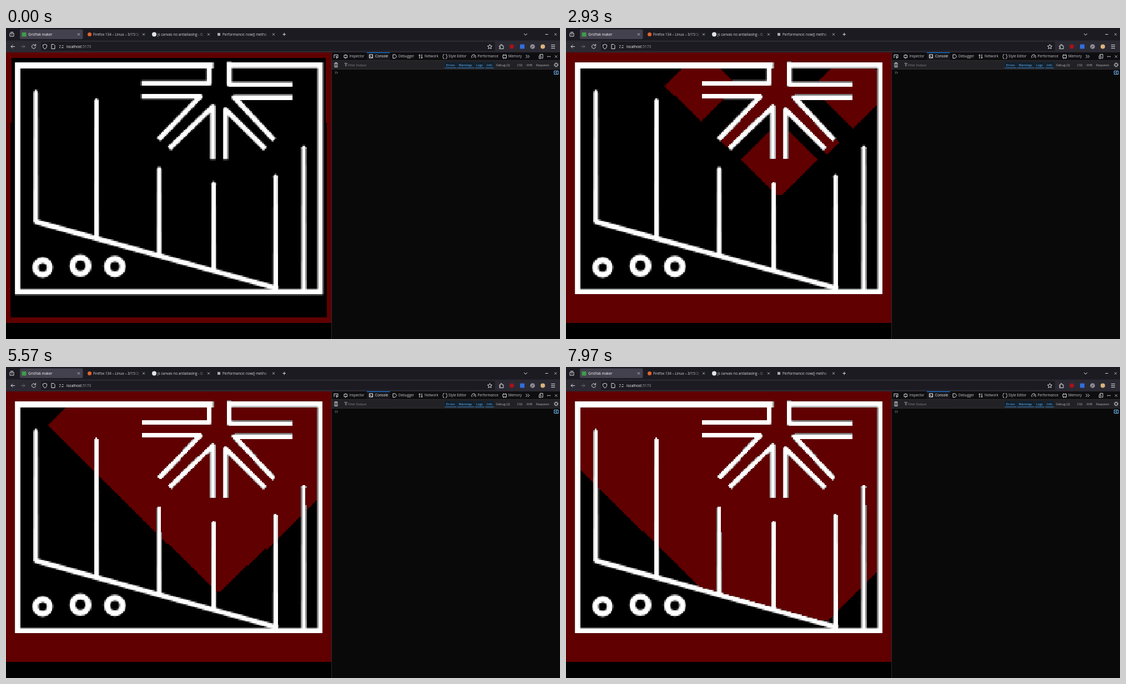
An HTML page with a canvas that plays this animation: 998 px wide and 561 px high, repeating every 8000 ms.

```html
<!DOCTYPE html>
<html lang="en">
<head>
<meta charset="utf-8">
<title>Flood fill</title>
<style>
html, body { margin: 0; width: 100%; height: 100%; overflow: hidden; background: #000; }
svg, canvas { position: absolute; left: 0; display: block; }
svg { top: 0; }
canvas { top: 44px; width: 586px; height: 488px; image-rendering: pixelated; }
text { font-family: "Open Sans", "Noto Sans", sans-serif; white-space: pre; }
.icon { fill: none; stroke: #dcdce2; stroke-width: 1; }
</style>
</head>
<body>
<svg width="998" height="561" viewBox="0 0 998 561">
  <defs>
    <linearGradient id="fade">
      <stop offset="0" stop-color="#1c1b22" stop-opacity="0"/>
      <stop offset="1" stop-color="#1c1b22"/>
    </linearGradient>
  </defs>
  <rect width="998" height="23" fill="#1c1b22"/>
  <rect x="25" y="2.5" width="113.500" height="17.500" rx="2" fill="#42414d"/>
  <rect y="22.500" width="998" height="21.500" fill="#2b2a33"/>
  <rect x="63" y="25" width="818" height="16.500" rx="2" fill="#1c1b22"/>
  <rect x="586" y="44" width="412" height="517" fill="#09090a"/>
  <rect x="587" y="44" width="411" height="15" fill="#0e0e11"/>
  <rect x="587" y="59" width="411" height="15.500" fill="#222226"/>
  <path d="M586.500 44V561M587 58.500H998M587 74.500H998" stroke="#2c2c32"/>
  <rect x="650" y="44" width="41.500" height="14" fill="#17171c"/>
  <path d="M650 44.500H691.500" stroke="#0a84ff" stroke-width="1.2"/>

  <rect x="28.500" y="8" width="8" height="7.500" fill="#3f9a4d"/>
  <circle cx="150.500" cy="11.500" r="3.500" fill="#e0662f"/>
  <circle cx="267" cy="11.500" r="4" fill="#dfe3ea"/>
  <rect x="381" y="9" width="5" height="5" fill="#a9a9b2"/>
  <circle cx="911" cy="33.500" r="4" fill="#a5121c"/>
  <rect x="926" y="29.500" width="8" height="8" rx="1" fill="#2f6fe0"/>
  <circle cx="948.500" cy="33.500" r="4.300" fill="#8e8e98"/>
  <circle cx="967" cy="33.500" r="4" fill="#d9b27c"/>

  <g class="icon">
    <path d="M7 9.500h7v5.500h-7zM8 7.500h5M9.500 12h2"/>
    <path d="M16 33.500H9M12 30.500L9 33.500L12 36.500"/>
    <path d="M27 33.500h7M31 30.500L34 33.500L31 36.500" stroke="#6e6d78"/>
    <path d="M52.500 31A3.500 3.500 0 1 0 53.500 34M53.500 29v3h-3"/>
    <path d="M70 29.500L73.500 30.500V33.500Q73 36.500 70 38Q67 36.500 66.500 33.500V30.500Z"/>
    <path d="M82 29.500h4l2 2v6h-6z"/>
    <path d="M96 32h3M101 32h2.500M96 35.500h2M100 35.500h3.500"/>
    <path d="M871.500 29.500l1.200 2.700 2.900.3-2.200 2 .7 2.900-2.600-1.500-2.600 1.500.7-2.900-2.200-2 2.900-.3z"/>
    <path d="M889 32h2v-2h2.500v2h2.500v5.500h-7v-2h1.500v-1.500h-1.500z"/>
    <path d="M982 30.500h7M982 33.500h7M982 36.500h7"/>
    <path d="M933 10l3 3 3-3M971.500 11.500h5M498.500 11.500h5.500M501.200 8.700v5.500"/>
    <path d="M946 36l4-4" stroke="#30303a"/>
  </g>
  <g class="icon" stroke-width=".8">
    <path d="M591 54v-5.500h7v2.500M594.500 51l1.200 4 1-1.700 2-.7z"/>
    <path d="M609 49h5.500v4.500h-5.500zM611.700 47.500v1.500M611.700 53.500v2"/>
    <path d="M654.500 48h6v6h-6zM656 50l1.300 1.200-1.300 1.200M658 53h1.500" stroke="#fff"/>
    <path d="M697 48h4l3 3.200-3 3.300h-4z"/>
    <path d="M745 55v-7l-1.500 1.700M745 48l1.500 1.700M749 47.500v7l-1.500-1.700M749 54.500l1.500-1.700"/>
    <path d="M789.500 47.500q-2 0-2 2v1l-1 1 1 1v1q0 2 2 2M792 47.500q2 0 2 2v1l1 1-1 1v1q0 2-2 2"/>
    <path d="M839.500 54a3.700 3.700 0 1 1 6 0M842.500 53l1.500-3"/>
    <path d="M895 49h6.500v5h-6.500zM896.500 47.500v1.500M900 47.500v1.500M896.500 54v1.500M900 54v1.500"/>
    <path d="M936.500 48.500l2.700 2.800-2.700 2.800M940 48.500l2.700 2.800-2.700 2.800"/>
    <path d="M960.500 50h3v5h-3zM962 49v-1.500h5v7h-2"/>
    <path d="M975 51.500h1.300M977.300 51.500h1.300M979.600 51.500h1.300" stroke-width="1.400"/>
    <path d="M591 64h7M593 64v-1.300h3v1.300M592 65.500v5h5v-5M594.500 65.500v4"/>
    <path d="M610 63.500h4.500l-1.700 2.500v3l-1-.7v-2.300z" stroke="#8a8a94"/>
    <circle cx="991" cy="66.500" r="2.500"/>
    <circle cx="991" cy="66.500" r="3.700" stroke-dasharray="1.300 1.600"/>
    <path d="M592.500 78.500l2 2-2 2M595.500 78.500l2 2-2 2" stroke="#8f8f9a"/>
    <path d="M987.500 77.500h7.500v6h-7.500zM992 77.500v6M989 80.500h2" stroke="#75bfff"/>
  </g>
  <g id="labels"></g>
</svg>
<canvas id="board" width="225" height="188"></canvas>

<script>
const NS = 'http://www.w3.org/2000/svg';
const labels = document.getElementById('labels');

function add(tag, attrs, text = '') {
  const el = document.createElementNS(NS, tag);
  for (const key in attrs) el.setAttribute(key, attrs[key]);
  el.textContent = text;
  labels.append(el);
}

const label = (x, y, text, size, fill) => add('text', { x, y, 'font-size': size, fill }, text);
const cross = (x, y, r) => add('path', {
  d: `M${x - r} ${y - r}l${2 * r} ${2 * r}m0 ${-2 * r}l${-2 * r} ${2 * r}`,
  stroke: '#d0d0d8', 'stroke-width': 0.8
});

// Browser tabs
label(40, 13.6, 'GridYak maker', 6.4, '#fbfbfe');
label(157, 13.6, 'Firefox 134 – Linux – 3/15/2(', 6.4, '#d8d8de');
label(273, 13.6, 'js canvas no antialiasing - G', 6.4, '#d8d8de');
label(390, 13.6, 'Performance: now() metho', 6.4, '#d8d8de');
for (const x of [228, 345, 462]) {
  add('rect', { x, y: 5, width: 16, height: 13, fill: 'url(#fade)' });
  add('rect', { x: x + 16, y: 5, width: 12, height: 13, fill: '#1c1b22' });
}
for (const x of [131, 248, 365, 482]) cross(x, 11.5, 2);
cross(990, 11.5, 2);
cross(991, 51.5, 2.2);

label(109, 35.8, 'localhost', 6.5, '#fbfbfe');
label(136.5, 35.8, ':5173', 6.5, '#a5a5ad');

// Developer tools
const tools = { Inspector: 618.5, Console: 665, Debugger: 707, Network: 754, 'Style Editor': 797, Performance: 849.5, Memory: 905 };
for (const name in tools) label(tools[name], 53.4, name, 6.2, name === 'Console' ? '#ffffff' : '#c8c8ce');

label(616, 68.6, 'Filter Output', 5.6, '#85858f');
const filters = { Errors: [793, 16], Warnings: [815.5, 25], Logs: [847, 12], Info: [866, 10] };
for (const name in filters) {
  const [x, width] = filters[name];
  add('rect', { x: x - 2.5, y: 61.5, width: width + 5, height: 10.5, fill: '#10202f' });
  add('rect', { x: x - 2.5, y: 71.5, width: width + 5, height: 0.9, fill: '#4a94d8' });
  label(x, 68.6, name, 5.5, '#75bfff');
}
const modes = { 'Debug (2)': 883, CSS: 921, XHR: 937.5, Requests: 955 };
for (const name in modes) label(modes[name], 68.6, name, 5.5, '#b4b4bb');

// Maze
const W = 225, H = 188, VIEW_W = 586, VIEW_H = 488, TOP = 44;
const ctx = document.getElementById('board').getContext('2d', { willReadFrequently: true });

function ring(x, y, r) {
  ctx.beginPath();
  ctx.arc(x, y, r, 0, 7);
  ctx.stroke();
}

function drawWalls() {
  ctx.scale(W / VIEW_W, H / VIEW_H);
  ctx.translate(0, -TOP);
  ctx.strokeStyle = ctx.fillStyle = '#fff';
  ctx.lineWidth = 10;
  ctx.stroke(new Path2D('M374 67.400H20.800V475.700H566.200V67H402'));
  ctx.lineWidth = 9;
  ctx.lineJoin = 'round';
  ctx.stroke(new Path2D(
    'M366 67V99.500H244 M402.500 61V101.500H516' +
    'M244 123.500H350L275 201 M516 125H411L483 202' +
    'M294 217L372.500 142V237 M395.500 237V147L467 218' +
    'M52 349L490 470'));
  ctx.lineWidth = 11;
  ring(66, 432, 13);
  ring(134, 429, 14.5);
  ring(196, 430, 14);

  const posts = [[54, 111, 350], [163, 126, 379], [276, 249, 410], [374, 276, 438], [485.5, 263, 470], [536.5, 211, 472]];
  for (const [x, top, end] of posts) {
    ctx.fill(new Path2D(`M${x - 4.2} ${end}L${x - 3.8} ${top + 5}Q${x} ${top - 4} ${x + 3.8} ${top + 5}L${x + 4.2} ${end}Z`));
  }
}

// Breadth-first order in which the cells get filled, starting at the border
function fillOrder(free) {
  const seen = new Uint8Array(W * H), queue = [];
  const push = i => {
    if (free[i] && !seen[i]) { seen[i] = 1; queue.push(i); }
  };
  for (let x = 0; x < W; x++) { push(x); push(W * (H - 1) + x); }
  for (let y = 0; y < H; y++) { push(W * y); push(W * y + W - 1); }
  for (let n = 0; n < queue.length; n++) {
    const i = queue[n], x = i % W;
    if (i >= W) push(i - W);
    if (x > 0) push(i - 1);
    if (x < W - 1) push(i + 1);
    if (i < W * (H - 1)) push(i + W);
  }
  return queue;
}

drawWalls();
const image = ctx.getImageData(0, 0, W, H);
const free = new Uint8Array(W * H);
const base = new Uint32Array(W * H);
for (let i = 0; i < base.length; i++) {
  const a = image.data[i * 4 + 3];
  free[i] = a < 128 ? 1 : 0;
  base[i] = 0xff000000 + a * 0x10101;
}
const order = fillOrder(free);
const pixels = new Uint32Array(image.data.buffer);

const LOOP = 8000, STEP = 100 / 3, PER_STEP = 108.5, FIRST = 2970, RED = 0xff000060;

function render(t) {
  const step = Math.floor((t + 3.4) / STEP) % 240;
  const count = Math.min(order.length, FIRST + PER_STEP * step);
  pixels.set(base);
  for (let n = 0; n < count; n++) pixels[order[n]] = RED;
  ctx.putImageData(image, 0, 0);
}

const start = performance.now();
function tick() {
  render((performance.now() - start) % LOOP);
  requestAnimationFrame(tick);
}
tick();
</script>
</body>
</html>
```
